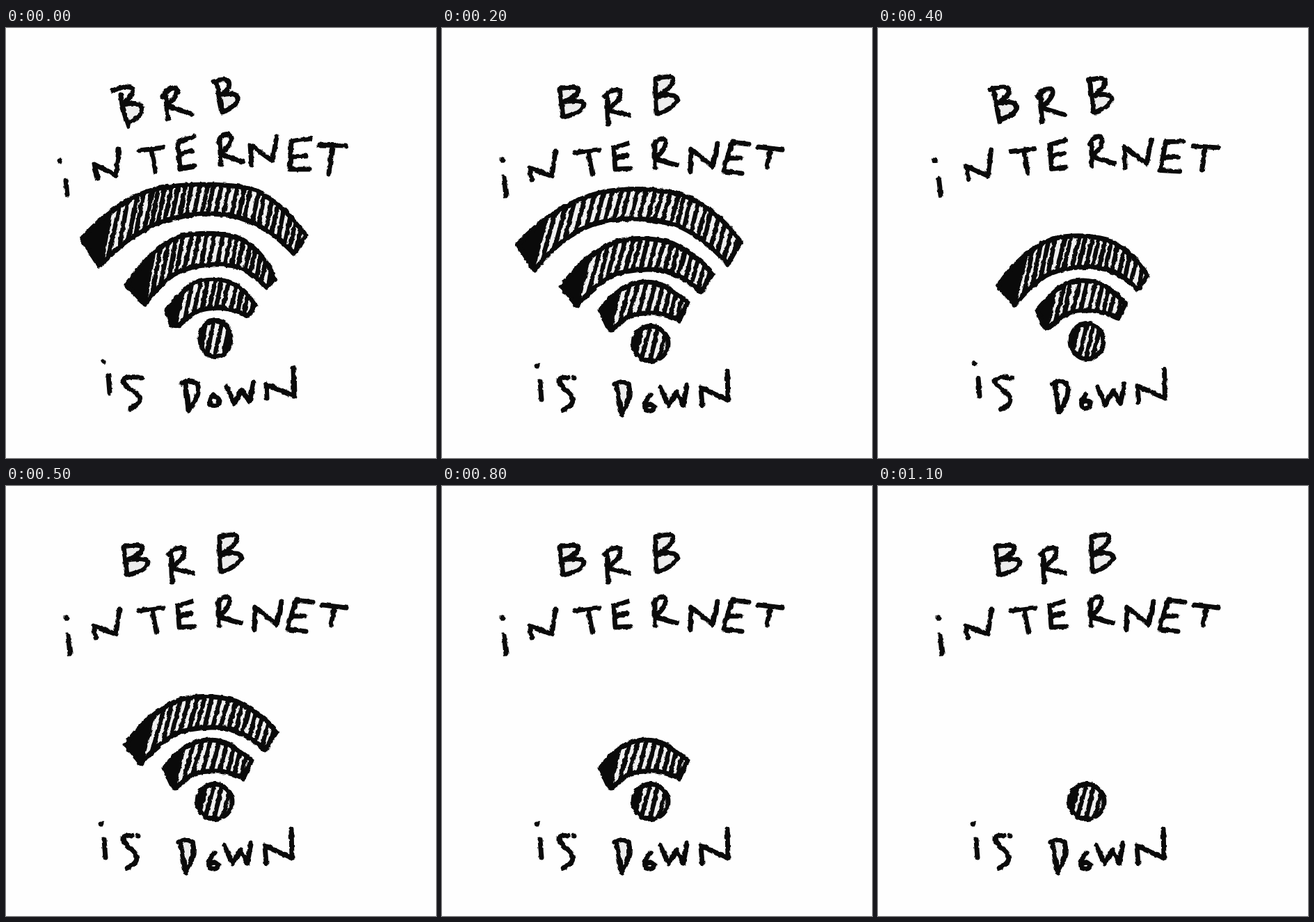
An HTML page for the animation above (1200 ms loop, 618 by 618 pixels).

```html
<!DOCTYPE html>
<html lang="en">
<head>
<meta charset="utf-8">
<title>BRB internet is down</title>
<style>
  html, body { margin: 0; width: 100%; height: 100%; overflow: hidden; background: #fefefe; }
  svg { display: block; width: 100vw; height: 100vh; }
  .ink { fill: none; stroke: #0a0a0a; stroke-width: 7; stroke-linecap: round; stroke-linejoin: round; }
  .tint { fill: #ededed; }
  .gap { fill: #f1f1f1; }
  .pose { animation: pose .3s step-end infinite; }
  .bar1 { animation: bar1 1.2s step-end infinite; }
  .bar2 { animation: bar2 1.2s step-end infinite; }
  .bar3 { animation: bar3 1.2s step-end infinite; }
  @keyframes pose { 0% { opacity: 1 } 33.333%, 100% { opacity: 0 } }
  @keyframes bar1 { 0% { opacity: 1 } 75%, 100% { opacity: 0 } }
  @keyframes bar2 { 0% { opacity: 1 } 50%, 100% { opacity: 0 } }
  @keyframes bar3 { 0% { opacity: 1 } 25%, 100% { opacity: 0 } }
</style>
</head>
<body>
<svg id="stage" viewBox="0 0 618 618" role="img" aria-label="BRB internet is down"></svg>
<script>
// Each letter: [first pose, last pose], with matching path commands.
const letters = [
  // BRB
  ['M153 90Q174 81 181 87Q184 96 168 110Q190 105 195 114Q199 124 176 137M165 97Q168 120 176 141',
   'M169 87Q192 83 196 88Q197 97 176 106Q200 102 204 109Q203 122 174 128M169 88Q172 108 174 128'],
  ['M230 90Q230 112 233 131M225 98Q236 83 245 87Q251 95 230 112Q248 116 266 124',
   'M238 93Q237 117 239 138M234 99Q245 86 255 90Q260 101 238 117Q255 123 269 125'],
  ['M299 77Q316 71 320 77Q324 87 308 97Q329 91 333 100Q335 111 311 121M303 78Q306 100 311 121',
   'M306 73Q330 67 332 73Q333 85 309 98Q336 93 339 103Q330 118 309 123M306 74Q307 98 309 123'],
  // INTERNET
  ['M76 191L78 191M86 219L88 240', 'M86 189L87 190M89 215L92 241'],
  ['M132 217L127 196L158 212L162 175', 'M129 218L126 201L158 213L163 177'],
  ['M192 176L225 172M209 176L215 206', 'M191 179L225 175M210 178L216 209'],
  ['M270 156L247 164L250 202L270 198M250 182L267 176', 'M267 166L247 172L249 203L270 202M249 187L266 183'],
  ['M307 162L309 196M305 164Q312 150 320 153Q330 162 309 181Q325 188 340 192',
   'M306 168L306 201M304 168Q312 157 320 160Q326 170 306 188Q322 193 337 197'],
  ['M353 197L351 168L383 191L389 156', 'M357 206L358 174L389 199L396 166'],
  ['M437 159L410 163L408 203L436 203M412 185L432 184', 'M441 167L417 164L404 206L431 209M411 187L429 187'],
  ['M450 168L488 169M469 170L464 209', 'M455 171L489 175M472 174L467 199'],
  // IS DOWN
  ['M140 479L141 480M147 499L149 524', 'M136 485L138 485M141 508L143 534'],
  ['M194 503L195 503M190 502Q170 500 168 507Q170 515 188 525Q199 538 179 547',
   'M189 503L190 503M181 502Q167 502 168 508Q172 516 184 526Q195 540 174 549'],
  ['M258 510L262 550M253 511Q266 503 275 512Q281 526 262 550',
   'M251 514L258 555M248 512Q262 505 268 512Q274 530 258 555'],
  ['M298 527Q290 538 296 542Q306 544 307 536Q305 530 297 530',
   'M300 527Q288 540 293 549Q304 553 305 544Q300 538 292 544'],
  ['M317 515L328 540L339 520L350 537L356 509', 'M314 517L326 543L337 523L347 542L352 514'],
  ['M375 532L374 512L414 529L413 488', 'M374 542L372 517L411 535L410 493']
];

const tints = [
  ['M168 110Q190 105 195 114Q199 124 176 137Z', 'M176 106Q200 102 204 109Q203 122 174 128Z'],
  ['M308 97Q329 91 333 100Q335 111 311 121Z', 'M309 98Q336 93 339 103Q330 118 309 123Z']
];
const lateTint = 'M169 87Q192 83 196 88Q197 97 174 106ZM306 73Q330 67 332 73Q333 85 309 98Z'
  + 'M251 513Q262 505 268 512Q274 530 258 555Z';

// Hatching: x range, middle y, half height, width of the solid left end.
const shapes = [
  { x: 274, end: 330, y: 450, half: 35, solid: 7, paths: [
    'M279 446A22 26 0 1 1 279 447Z', 'M275 453A25 25 0 1 1 275 454Z'] },
  { x: 228, end: 368, y: 395, half: 45, solid: 22, paths: [
    'M231 406Q252 378 272 365Q300 356 328 368Q345 377 358 399L348 414Q328 404 308 402Q285 402 272 408Q262 414 248 428L238 427Z',
    'M227 405Q250 378 270 369Q295 360 320 371Q340 384 353 394L341 420Q325 412 308 410Q285 409 272 413Q260 418 244 434L240 433Z'] },
  { x: 172, end: 400, y: 345, half: 62, solid: 32, paths: [
    'M173 369Q215 310 252 299Q290 291 330 300Q368 316 386 360L374 373Q348 343 315 340Q270 338 240 355Q222 367 199 397Z',
    'M172 372Q205 325 250 307Q290 297 330 309Q365 325 389 353L372 379Q345 354 315 348Q270 344 240 358Q215 374 194 399Z'] },
  { x: 106, end: 450, y: 285, half: 70, solid: 40, paths: [
    'M109 303Q170 235 235 228Q292 221 350 230Q392 245 431 298L414 324Q372 280 325 270Q270 260 215 282Q175 300 134 342Z',
    'M109 311Q165 250 235 235Q295 226 345 240Q390 255 429 307L411 339Q370 295 335 283Q270 265 215 283Q170 300 133 348Z'] }
];

const noise = n => { const s = Math.sin(n * 12.9898) * 43758.5453; return s - Math.floor(s); };

// Blend two paths that share the same commands.
function mix([a, b], t) {
  const to = b.match(/\d+/g);
  let i = 0;
  return a.replace(/\d+/g, v => +v + (to[i++] - v) * t);
}

function hatch(s, t, seed) {
  const lean = .2 + .06 * t, step = 10.2 + 1.3 * t;
  let d = '', x = s.x, i = seed * 100 + s.x;
  while (x < s.end) {
    const dx = s.half * (lean + (noise(i) - .5) * .06);
    d += `M${x + dx} ${s.y - s.half}L${x - dx} ${s.y + s.half}`;
    x += x < s.x + s.solid ? 4.5 : step + (noise(i + .5) - .5) * 3.6;
    i++;
  }
  return d;
}

function shape(s, n, t, k) {
  const d = mix(s.paths, t), id = `clip${k}${n}`;
  return `<g class="bar${n}"><clipPath id="${id}"><path d="${d}"/></clipPath>
    <path class="gap" d="${d}"/>
    <path class="ink" clip-path="url(#${id})" style="stroke-width:6.4" d="${hatch(s, t, k + 1)}"/>
    <path class="ink" d="${d}"/></g>`;
}

function pose(t, k) {
  const late = t === 1 ? lateTint : '';
  return `<filter id="rough${k}" filterUnits="userSpaceOnUse" x="0" y="0" width="618" height="618" color-interpolation-filters="sRGB">
      <feTurbulence type="fractalNoise" baseFrequency=".13" numOctaves="2" seed="${k + 3}"/>
      <feDisplacementMap in="SourceGraphic" scale="4.5" xChannelSelector="R" yChannelSelector="G"/>
    </filter>
    <g class="pose" style="animation-delay:${(k - 3) % 3 * 100}ms"><g filter="url(#rough${k})">
      <path class="tint" d="${tints.map(p => mix(p, t)).join('') + late}"/>
      <path class="ink" d="${letters.map(p => mix(p, t)).join('')}"/>
      ${shapes.map((s, n) => shape(s, n, t, k)).join('')}
    </g></g>`;
}

document.getElementById('stage').innerHTML = [0, .5, 1].map(pose).join('');
</script>
</body>
</html>
```
